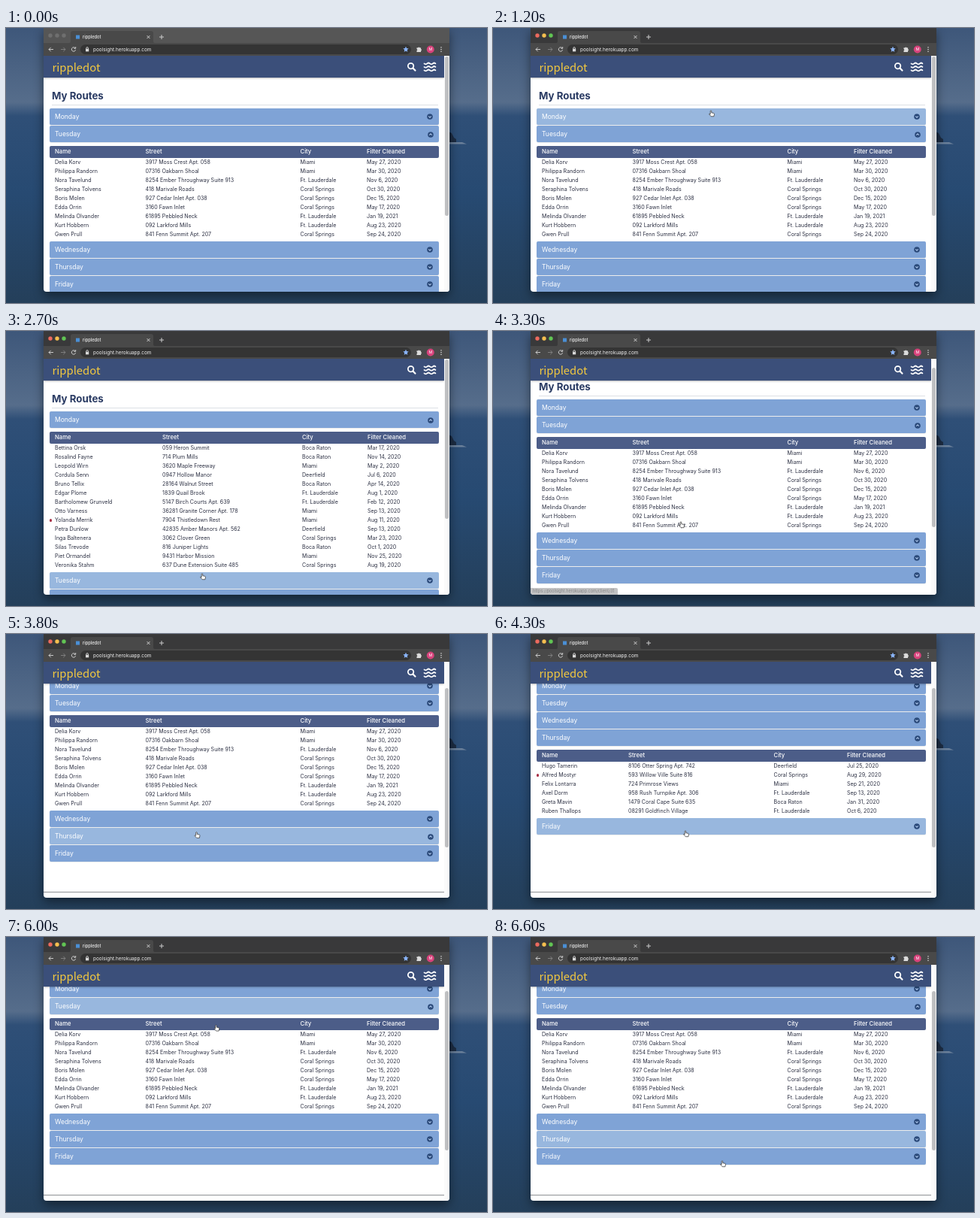
Animation, 640 px wide and 366 px high, one loop 6700 ms. Source, as an HTML page:

```html
<!DOCTYPE html>
<html lang="en">
<head>
<meta charset="utf-8">
<title>rippledot</title>
<style>
html, body { margin: 0; width: 100%; height: 100%; overflow: hidden; }
body {
  position: relative; font-family: Inter, Roboto, sans-serif;
  background: linear-gradient(#3e577a, #566d8b 27%, #2f4f77 32%, #274a72 60%, #243f5a);
}
div, svg, span { position: absolute; }
svg { overflow: visible; }
#win { left: 50px; top: 0; width: 540px; height: 351px; overflow: hidden; background: #fff; border-radius: 0 0 4px 4px; }
#shade { left: 50px; top: 0; width: 540px; height: 351px; border-radius: 4px; box-shadow: 0 5px 14px #0007; }
#page { left: 0; top: 0; width: 533px; height: 500px; }
h1 { position: absolute; left: 11px; top: 80px; margin: 0; font: bold 13.3px/20px Inter, sans-serif; color: #2a3b63; }
.rule { height: 1px; }
#days { left: 7.5px; top: 107px; width: 518px; }
.bar, .panel { position: relative; width: 518px; }
.bar {
  height: 22px; margin-bottom: 1px; border-radius: 2px; background: #7fa3d6; color: #fff;
  font-size: 8.5px; line-height: 22px; text-indent: 7.5px; box-shadow: 0 .5px 1px #0002;
}
.bar.hover { background: #98b7de; }
.bar svg { left: 506.5px; top: 11px; }
.panel { overflow: hidden; }
.head { left: 0; top: 3.5px; width: 518px; height: 16px; border-radius: 2px; background: #4c5d88; color: #fff; font-size: 7.7px; font-weight: 500; line-height: 16.5px; }
.row { left: 0; width: 518px; height: 12px; color: #2b2f42; font-size: 7.1px; line-height: 12px; }
.row span, .head span { white-space: nowrap; }
.row i { position: absolute; left: .4px; top: 4.2px; width: 3.4px; height: 3.4px; border-radius: 50%; background: #a82f45; }
#nav { left: 0; top: 37px; width: 533px; height: 29px; background: #3b4f7a; box-shadow: 0 1px 2px #0004; }
#nav span { left: 11.5px; top: -.5px; font: 14.8px/29px "Noto Sans CJK JP", "Noto Sans", sans-serif; color: #f3c93f; }
#track { left: 533px; top: 37px; width: 7px; height: 314px; background: #fafafa; }
#thumb { left: 1px; width: 4.5px; height: 212px; border-radius: 3px; background: #bfc0c2; }
#status { left: 0; top: 342px; width: 116px; height: 9px; background: #c2c2c3; color: #858585; font-size: 5.5px; line-height: 9px; text-indent: 3px; border-radius: 0 2px 0 0; }
</style>
</head>
<body>
<svg width="640" height="366">
  <path d="M589 138l4 2 3 6 3 2v6h-10z" fill="#1c2c42"/>
  <path d="M590 154.500h23l-6-2.500h-17z" fill="#6b809a"/>
</svg>
<div id="shade"></div>
<div id="win">
  <div id="page">
    <h1>My Routes</h1>
    <div class="rule" style="left:11px;top:101.5px;width:514px;background:#dcdfe5"></div>
    <div id="days"></div>
    <div class="rule" style="left:0;top:391.5px;width:533px;background:#8d8f94"></div>
  </div>
  <div id="nav">
    <span>rippledot</span>
    <svg fill="none" stroke="#fff" stroke-linecap="round">
      <circle cx="488.6" cy="13.6" r="3.7" stroke-width="1.8"/>
      <path d="M491.5 16.5l3 3" stroke-width="2.2"/>
      <path d="M506.500 10.300q2 1.600 3.800 0t3.800 0 3.800 0 3.600 0m-15 4.500q2 1.600 3.800 0t3.800 0 3.800 0 3.600 0m-15 4.500q2 1.600 3.800 0t3.800 0 3.800 0 3.600 0" stroke-width="1.7"/>
    </svg>
  </div>
  <div id="track"><div id="thumb"></div></div>
  <div id="status">https://poolsight.herokuapp.com/client/31</div>
  <svg width="540" height="37" font-family="Inter, sans-serif">
    <path id="strip" d="M0 0h540v21H0z"/>
    <g id="lights"><circle cx="9" cy="10" r="2.7"/><circle cx="18" cy="10" r="2.7"/><circle cx="27" cy="10" r="2.7"/></g>
    <path d="M0 20h34q2 0 2-2V7q0-3 3-3h104q3 0 3 3v11q0 2 2 2h392v17H0z" fill="#494949"/>
    <rect x="43" y="9.500" width="5" height="5" fill="#4a8fd6"/>
    <text x="52" y="14" font-size="5.700" font-weight="500" fill="#f0f0f0">rippledot</text>
    <rect x="49" y="22" width="440" height="13" rx="6.500" fill="#343434"/>
    <text x="66" y="30.700" font-size="6.450" fill="#f2f2f2">poolsight.herokuapp.com</text>
    <g fill="none" stroke="#d8d8d8" stroke-width=".9">
      <path d="M137.500 10l4 4m0-4l-4 4M154 12h6m-3-3v6"/>
      <path d="M13 28.500H7m2.700-2.700L7 28.500l2.700 2.700"/>
      <path d="M23 28.500h6m-2.700-2.700l2.700 2.700-2.700 2.700" stroke="#858585"/>
      <path d="M42 26.600a2.700 2.700 0 1 0 .6 2.500M42.700 25v2.300h-2.300"/>
      <path d="M56.800 28v-1.200a1.300 1.300 0 0 1 2.600 0V28"/>
    </g>
    <path d="M56 27.700h4.200v3.600H56z" fill="#d8d8d8"/>
    <path d="M482 24.600l1.100 2.400 2.600.3-1.900 1.800.5 2.600-2.300-1.300-2.300 1.300.5-2.600-1.900-1.800 2.600-.3z" fill="#8ab4f8"/>
    <path d="M496.500 26.300h1.700a1.200 1.200 0 0 1 2.300 0h1.600v1.700a1.200 1.200 0 0 1 0 2.300v1.600h-5.600v-1.800a1.100 1.100 0 0 0 0-2.100z" fill="#dcdcdc"/>
    <circle cx="514.800" cy="28.500" r="5" fill="#d8437c"/>
    <text x="514.800" y="30.400" font-size="5.200" fill="#fff" text-anchor="middle">M</text>
    <g fill="#d8d8d8"><circle cx="529" cy="25.800" r=".8"/><circle cx="529" cy="28.500" r=".8"/><circle cx="529" cy="31.200" r=".8"/></g>
  </svg>
</div>
<svg id="cursor" style="left:0;top:0" width="1" height="1" fill="#fff" stroke="#333" stroke-width=".8" stroke-linejoin="round">
  <path id="hand" d="M-2-4q.9-1.200 1.700 0v2.600l3.200.7q1 .3.8 1.500L3.100 4h-4L-3.800.8q-.3-1.200 1.800-.1z"/>
  <path id="arrow" d="M-2.500-4v8l1.900-1.700L.6 5l1.200-.5L.6 1.900h2.500z" fill="#111" stroke="#fff"/>
</svg>
<script>
// Each line: name, street, city, filter date; a star marks a flagged client.
const DAYS = [
  { name: "Monday", cols: [65, 208, 394, 481], rows: `Bettina Orsk|059 Heron Summit|Boca Raton|Mar 17, 2020
Rosalind Fayne|714 Plum Mills|Boca Raton|Nov 14, 2020
Leopold Wirn|3620 Maple Freeway|Miami|May 2, 2020
Cordula Senn|0947 Hollow Manor|Deerfield|Jul 6, 2020
Bruno Tellix|28164 Walnut Street|Boca Raton|Apr 14, 2020
Edgar Plome|1839 Quail Brook|Ft. Lauderdale|Aug 1, 2020
Bartholomew Grunveld|5147 Birch Courts Apt. 639|Ft. Lauderdale|Feb 12, 2020
Otto Varness|36281 Granite Corner Apt. 178|Miami|Sep 13, 2020
*Yolanda Merrik|7904 Thistledown Rest|Miami|Aug 11, 2020
Petra Dunlow|42835 Amber Manors Apt. 562|Deerfield|Sep 13, 2020
Inga Baltenera|3062 Clover Green|Coral Springs|Mar 23, 2020
Silas Trevode|816 Juniper Lights|Boca Raton|Oct 1, 2020
Piet Ormandel|9431 Harbor Mission|Miami|Nov 25, 2020
Veronika Stahm|637 Dune Extension Suite 485|Coral Springs|Aug 19, 2020` },
  { name: "Tuesday", cols: [65, 185.5, 391.5, 480], rows: `Delia Korv|3917 Moss Crest Apt. 058|Miami|May 27, 2020
Philippa Randorn|07316 Oakbarn Shoal|Miami|Mar 30, 2020
Nora Tavelund|8254 Ember Throughway Suite 913|Ft. Lauderdale|Nov 6, 2020
Seraphina Tolvens|418 Marivale Roads|Coral Springs|Oct 30, 2020
Boris Molen|927 Cedar Inlet Apt. 038|Coral Springs|Dec 15, 2020
Edda Orrin|3160 Fawn Inlet|Coral Springs|May 17, 2020
Melinda Olvander|61895 Pebbled Neck|Ft. Lauderdale|Jan 19, 2021
Kurt Hobbern|092 Larkford Mills|Ft. Lauderdale|Aug 23, 2020
Gwen Prull|841 Fenn Summit Apt. 207|Coral Springs|Sep 24, 2020` },
  { name: "Wednesday", cols: [], rows: "" },
  { name: "Thursday", cols: [65, 180, 373.5, 471], rows: `Hugo Tamerin|8106 Otter Spring Apt. 742|Deerfield|Jul 25, 2020
*Alfred Mostyr|593 Willow Ville Suite 816|Coral Springs|Aug 29, 2020
Felix Lontarra|724 Primrose Views|Miami|Sep 21, 2020
Axel Dorm|958 Rush Turnpike Apt. 306|Ft. Lauderdale|Sep 13, 2020
Greta Mavin|1479 Coral Cape Suite 635|Boca Raton|Jan 31, 2020
Ruben Thallops|08291 Goldfinch Village|Ft. Lauderdale|Oct 6, 2020` },
  { name: "Friday", cols: [65, 183, 390, 479], rows: `Oscar Wendrell|0371 Bramble Crossing Suite 528|Boca Raton|Nov 27, 2020
Lorelei Tarn|4895 Meadow Walk Apt. 360|Coral Springs|May 30, 2020
Milos Farrandine|758 Badger Trail|Deerfield|Nov 18, 2020
Emil Soba|319 Flint Trafficway|Boca Raton|Jun 1, 2020
*Lukas Pombrey|2950 Stone Well Suite 167|Deerfield|Feb 2, 2020
Gideon Lurk|6487 Orchard Junctions Apt. 259|Miami|Apr 10, 2020
Agnes Wollmarch|51708 Pewter Valley Suite 436|Boca Raton|Feb 1, 2020
Humbert Delvason|73916 Ivy Passage|Deerfield|Dec 13, 2020
*Winifred Prant|8605 Poplar Island|Ft. Lauderdale|Nov 1, 2020
Trudy Glench|1793 Sorrel Fork|Ft. Lauderdale|Jun 20, 2020
Casper Tolmsen|269 Copper Wells Apt. 845|Miami|May 15, 2020
Rosamunda Velira|152 Saffron Avenue|Coral Springs|Aug 14, 2020
*Sigmund Barquist|08357 Elm Estates|Miami|Dec 20, 2020` }
];
const LOOP = 6700, STEP = 100, ACTIVE_AT = 900, OPEN_MS = 350;
const CLICKS = [[-1000, 1], [1300, 0], [2750, 1], [3800, 3], [4400, 4], [5550, 1]]; // time, day
const SCROLL = [[3200, 0], [3300, 16], [3500, 49]];
const PATH = [[100, 300, 380], [700, 291, 116], [1200, 291, 114], [1700, 291, 114], [2500, 262, 327],
  [2900, 262, 327], [3200, 251, 258], [3400, 251, 258], [3700, 254, 268], [4300, 257, 266], [4900, 257, 266],
  [5200, 272.500, 158], [5400, 274, 92], [5900, 276, 92], [6500, 302, 268], [6600, 306, 302], [6700, 308, 320]];

const $ = id => document.getElementById(id);
const clamp = v => Math.max(0, Math.min(1, v));
const ease = v => { v = clamp(v); return v * v * (3 - 2 * v); };

// Linear interpolation of column c in a list of [time, ...values]
function at(keys, t, c) {
  const i = keys.findIndex(k => k[0] > t);
  if (i < 0) return keys[keys.length - 1][c];
  if (!i) return keys[0][c];
  const a = keys[i - 1], b = keys[i];
  return a[c] + (b[c] - a[c]) * (t - a[0]) / (b[0] - a[0]);
}

for (const day of DAYS) {
  const rows = day.rows ? day.rows.split("\n") : [];
  const cells = list => list.map((s, i) => `<span style="left:${day.cols[i] - 57.5}px">${s}</span>`).join("");
  day.height = rows.length ? 23 + 12 * rows.length : 0;
  $("days").insertAdjacentHTML("beforeend", `<div class="bar">${day.name}
    <svg width="1" height="1"><circle r="3.8" fill="#2b4a7a"/><path d="M-1.800-.7L0 1.100 1.800-.7" fill="none" stroke="#a9c3e8" stroke-width="1.100"/></svg></div>
    <div class="panel"><div class="head">${cells(["Name", "Street", "City", "Filter Cleaned"])}</div>` +
    rows.map((r, i) => `<div class="row" style="top:${20 + 12 * i}px">` +
      (r[0] === "*" ? "<i></i>" : "") + cells(r.replace("*", "").split("|")) + "</div>").join("") + "</div>");
  day.panel = $("days").lastElementChild;
  day.bar = day.panel.previousElementSibling;
  day.icon = day.bar.querySelector("svg");
}

function draw(t) {
  const active = t >= ACTIVE_AT;
  const scroll = at(SCROLL, t, 1);
  const n = CLICKS.filter(c => c[0] <= t).length - 1;
  const [clicked, open] = CLICKS[n];
  const last = n ? CLICKS[n - 1][1] : -1;
  const grow = ease((t - clicked) / OPEN_MS);
  const pointed = at(PATH, t - STEP, 2); // the hover tint trails the pointer

  let y = 107 - scroll;
  DAYS.forEach((day, i) => {
    const h = day.height * (i === open ? grow : i === last ? 1 - grow : 0);
    day.panel.style.height = h + "px";
    day.icon.style.transform = i === open ? "rotate(180deg)" : "";
    day.bar.classList.toggle("hover", active && pointed >= y && pointed < y + 22);
    y += 23 + h;
  });
  $("page").style.transform = `translateY(${-scroll}px)`;
  $("thumb").style.top = 1 + scroll * .69 + "px";
  $("status").style.display = t >= 3200 && t < 3500 ? "" : "none";

  $("strip").setAttribute("fill", active ? "#39393a" : "#565656");
  [...$("lights").children].forEach((c, i) =>
    c.setAttribute("fill", active ? ["#ed6a5e", "#f5bf4f", "#61c554"][i] : "#6f6f6f"));
  $("hand").style.display = active ? "" : "none";
  $("arrow").style.display = active ? "none" : "";
  $("cursor").style.transform = `translate(${at(PATH, t, 1)}px, ${at(PATH, t, 2)}px) scale(.92)`;
}

const start = performance.now();
(function tick() {
  const t = (performance.now() - start) % LOOP;
  draw(Math.floor(t / STEP) * STEP);
  requestAnimationFrame(tick);
})();
</script>
</body>
</html>
```
